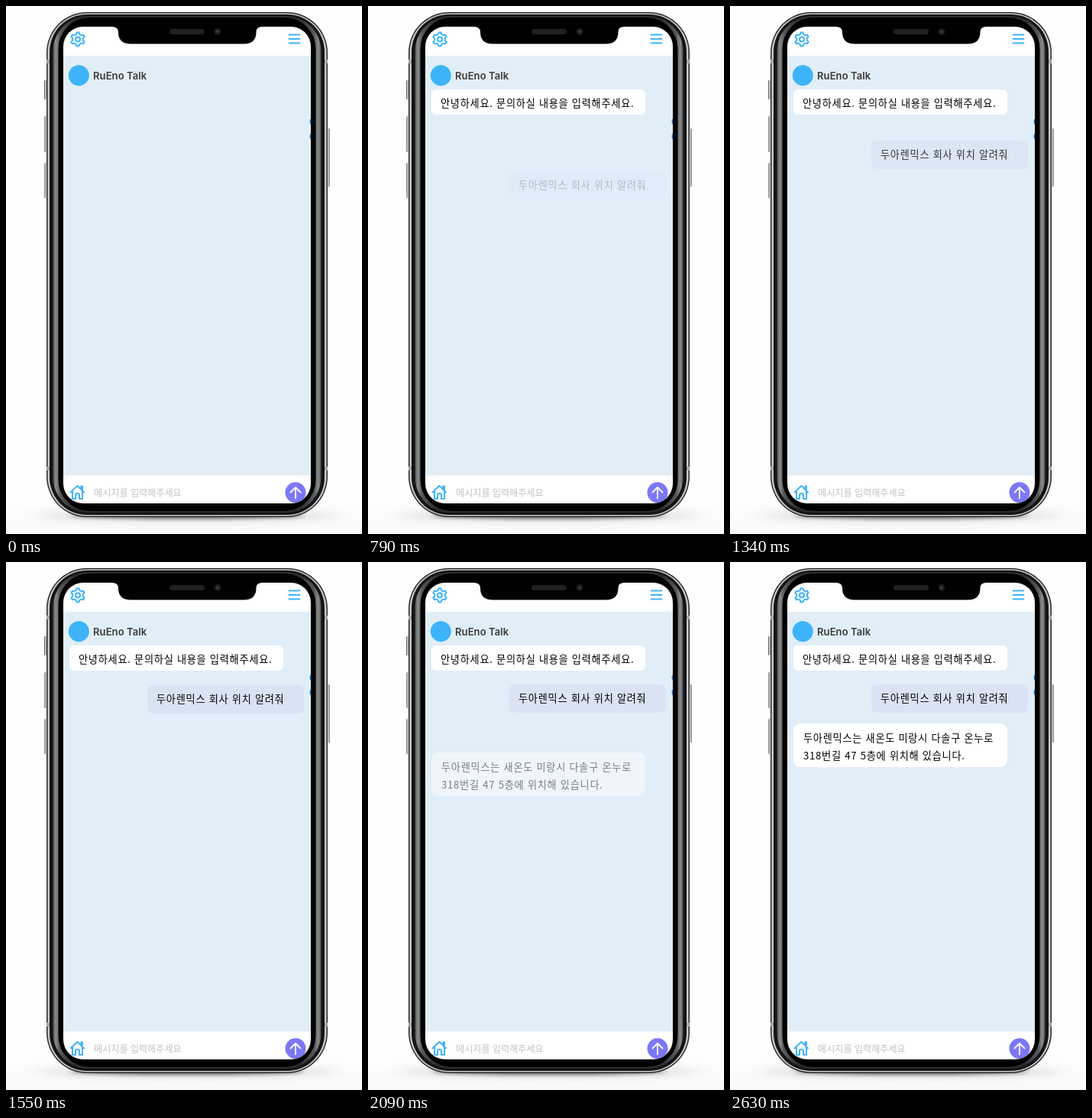
Write an HTML page that moves like this. It is 466 by 690 pixels and loops after 3.48 s.

```html
<!DOCTYPE html>
<html lang="ko">
<head>
<meta charset="utf-8">
<title>Chat demo</title>
<style>
  @property --k { syntax: "<number>"; inherits: true; initial-value: 0; }

  html, body { margin: 0; width: 100%; height: 100%; overflow: hidden; background: #fefefe; }
  svg { display: block; width: 466px; height: 690px; animation: tick 3480ms infinite; }
  text { font: 13.2px "Noto Sans CJK KR", "Noto Sans KR", "Noto Sans CJK", sans-serif; letter-spacing: .72px; }
  .title { font: 600 13px Inter, "Open Sans", sans-serif; letter-spacing: .1px; fill: #3a3a3a; }
  .hint { font-size: 12.1px; letter-spacing: 0; fill: #c2c2c2; }
  .line { fill: none; stroke: #3fb3f9; stroke-width: 2; stroke-linecap: round; stroke-linejoin: round; }

  /* --k counts the picture steps; each message derives its pose from it */
  @keyframes tick {
    0%, 1.61% { --k: 0; animation-timing-function: steps(8, start); }
    16.72% { --k: 8; animation-timing-function: step-end; }
    18.79% { --k: 8; animation-timing-function: steps(8, start); }
    34.31% { --k: 16; animation-timing-function: steps(8, start); }
    50.32% { --k: 24; animation-timing-function: steps(8, start); }
    65.72% { --k: 32; animation-timing-function: steps(6, start); }
    77.39%, 100% { --k: 38; }
  }
  .greeting { opacity: calc(var(--k) / 8); }
  .rise {
    --x: clamp(0, var(--k) - var(--from), 14.2);
    opacity: calc(var(--x) / 14.2);
    transform: translateY(calc((14.2 - var(--x)) * 5px));
  }
  .question { --from: 8; }
  .answer { --from: 23.4; }
</style>
</head>
<body>
<svg viewBox="0 0 466 690">
  <defs>
    <linearGradient id="steel" x2="1" y2="0">
      <stop offset="0" stop-color="#4a4b4d"/>
      <stop offset=".01" stop-color="#8c8d8f"/>
      <stop offset=".025" stop-color="#58595b"/>
      <stop offset=".08" stop-color="#2c2c2e"/>
      <stop offset=".92" stop-color="#2c2c2e"/>
      <stop offset=".975" stop-color="#58595b"/>
      <stop offset=".99" stop-color="#8c8d8f"/>
      <stop offset="1" stop-color="#4a4b4d"/>
    </linearGradient>
    <linearGradient id="key" x2="1" y2="0">
      <stop offset="0" stop-color="#444"/>
      <stop offset=".5" stop-color="#e4e4e4"/>
      <stop offset="1" stop-color="#444"/>
    </linearGradient>
    <linearGradient id="floor" x2="0" y2="1">
      <stop offset="0" stop-color="#000" stop-opacity="0"/>
      <stop offset="1" stop-color="#000" stop-opacity=".02"/>
    </linearGradient>
    <filter id="soft" x="-20%" y="-300%" width="140%" height="700%"><feGaussianBlur stdDeviation="5 2.500"/></filter>
    <filter id="wide" x="-30%" y="-300%" width="160%" height="700%"><feGaussianBlur stdDeviation="16 6"/></filter>
    <clipPath id="screen"><rect x="75" y="27" width="324" height="623" rx="26"/></clipPath>
  </defs>

  <!-- floor shadow -->
  <rect y="640" width="466" height="50" fill="url(#floor)"/>
  <ellipse cx="237" cy="666" rx="200" ry="7" opacity=".12" filter="url(#wide)"/>
  <ellipse cx="237" cy="666" rx="152" ry="4" opacity=".6" filter="url(#soft)"/>

  <!-- side keys -->
  <g fill="url(#key)">
    <rect x="50" y="97" width="4" height="25" rx="1"/>
    <rect x="50.5" y="144" width="4" height="47" rx="1"/>
    <rect x="50.5" y="205" width="4" height="46" rx="1"/>
    <rect x="419.5" y="160" width="4" height="76" rx="1"/>
  </g>

  <!-- body -->
  <rect x="53" y="8" width="368" height="660" rx="53" fill="#2b2b2d"/>
  <rect x="54.5" y="9.5" width="365" height="657" rx="51.500" fill="#c9cacc"/>
  <rect x="57" y="11" width="360" height="654" rx="49" fill="#141416"/>
  <rect x="61.5" y="13" width="351" height="649" rx="46" fill="url(#steel)"/>
  <rect x="68.500" y="15" width="337" height="645" rx="41"/>
  <g fill="#a5a6a8">
    <rect x="53" y="70" width="4" height="5"/>
    <rect x="417" y="70" width="4" height="5"/>
    <rect x="53" y="602" width="4" height="5"/>
    <rect x="417" y="602" width="4" height="5"/>
  </g>

  <g clip-path="url(#screen)">
    <rect x="75" y="27" width="324" height="623" fill="#fff"/>
    <rect x="75" y="65" width="324" height="548.5" fill="#e1eef8"/>

    <!-- gear and menu -->
    <g class="line">
      <path id="gear"/>
      <circle cx="94" cy="43.5" r="3"/>
      <path d="M370.5 37.5h14M370.5 43h14M370.5 48.5h14" stroke-width="1.8"/>
    </g>

    <circle cx="95.3" cy="90.8" r="13.5" fill="#3db4fa"/>
    <text class="title" x="114" y="95.5">RuEno Talk</text>
    <g fill="#0a8df8">
      <circle cx="404" cy="151" r="6.5"/>
      <circle cx="404" cy="170.5" r="6.5"/>
    </g>

    <g class="greeting">
      <rect x="83" y="109" width="280" height="33" rx="6" fill="#fff"/>
      <text x="95" y="132">안녕하세요. 문의하실 내용을 입력해주세요.</text>
    </g>
    <g class="rise question">
      <rect x="185" y="160" width="205" height="37" rx="7" fill="#dae3f4"/>
      <text x="197" y="183">두아렌믹스 회사 위치 알려줘</text>
    </g>
    <g class="rise answer">
      <rect x="83" y="211" width="280" height="57" rx="9" fill="#fff"/>
      <text x="96" y="235">두아렌믹스는 새온도 미랑시 다솔구 온누로</text>
      <text x="96" y="258">318번길 47 5층에 위치해 있습니다.</text>
    </g>

    <!-- input bar -->
    <path class="line" d="M84.5 635.5L93.5 627L102 635.5M98.5 630v-2.5h1.5v4M87 634v10h4v-5.5q0-1.5 2.5-1.5t2.5 1.5v5.5h4v-10"/>
    <text class="hint" x="115" y="640.5">메시지를 입력해주세요</text>
    <circle cx="379" cy="635.8" r="13.5" fill="#7b78f8"/>
    <path d="M379 643.5v-14M372.5 635.5l6.5-6.5 6.5 6.5" fill="none" stroke="#fff" stroke-width="1.8" stroke-linecap="round" stroke-linejoin="round"/>
  </g>

  <!-- notch -->
  <path d="M138 26h198v1q-8.500 0-8.500 7q0 15.500-16 15.500H163q-16 0-16-15.500q0-7-9-7z"/>
  <rect x="214" y="30" width="46" height="7" rx="3.5" fill="#202022"/>
  <circle cx="277" cy="33.5" r="4.5" fill="#1b1b1f"/>
  <circle cx="277" cy="33.5" r="1.5" fill="#4a4a58"/>
</svg>
<script>
  // gear outline: six teeth, four corners each
  const corners = [[-.3, 7], [-.16, 9.2], [.16, 9.2], [.3, 7]];
  const points = [];
  for (let i = 0; i < 6; i++)
    for (const [a, r] of corners) {
      const angle = i * Math.PI / 3 + Math.PI / 6 + a;
      points.push(`${(94 + r * Math.cos(angle)).toFixed(2)} ${(43.5 + r * Math.sin(angle)).toFixed(2)}`);
    }
  document.getElementById("gear").setAttribute("d", `M${points.join("L")}Z`);
</script>
</body>
</html>
```
